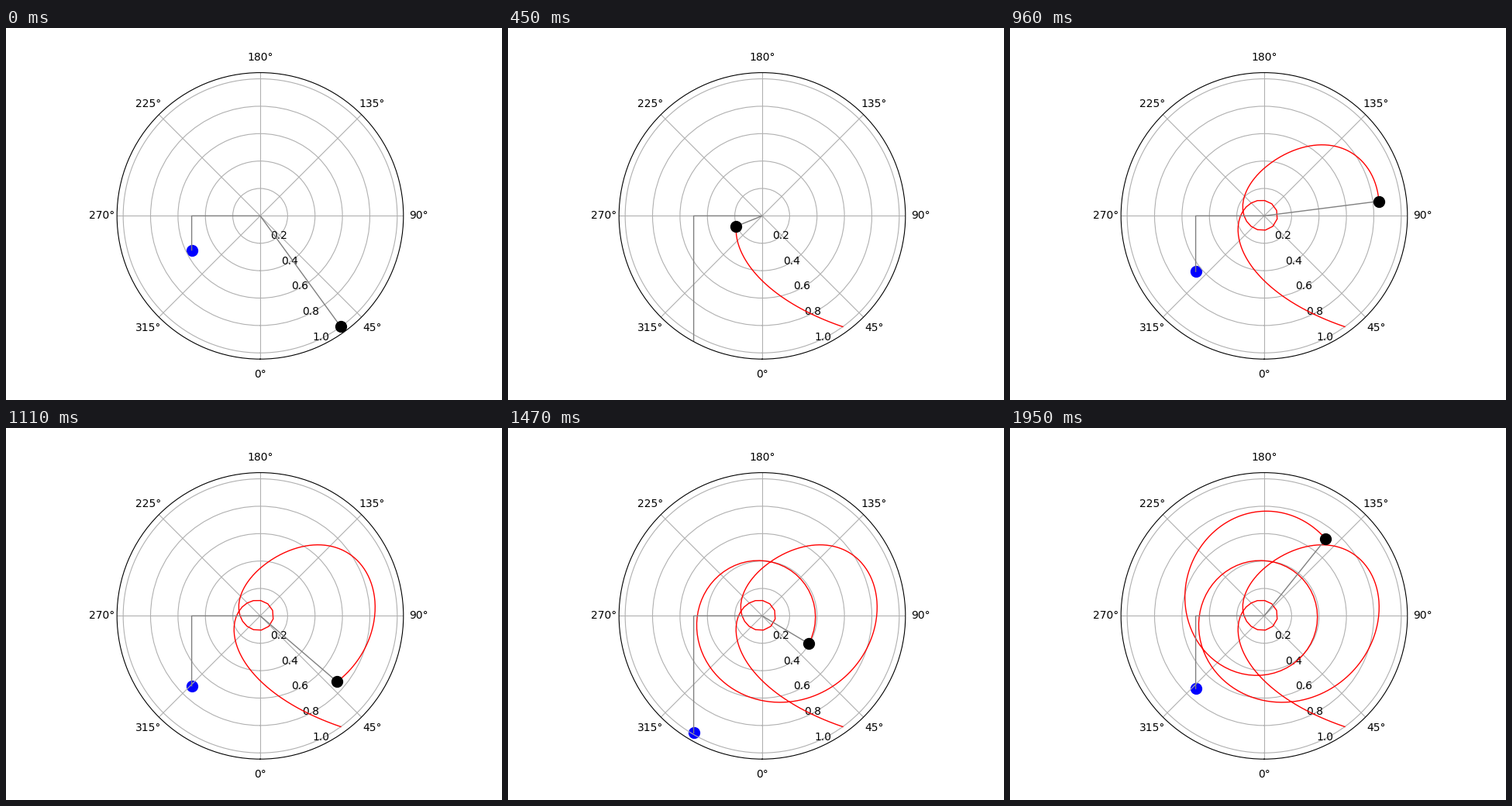
A matplotlib script that plays this animation: 640 by 480 pixels, repeating every 1980 ms.

```python
import math

import numpy as np
import matplotlib.pyplot as plt
from matplotlib.animation import FuncAnimation

# Swinging Atwood machine: a heavy counterweight and a free pendulum bob
G = 9.81
MU = 10.0            # counterweight mass / bob mass
ROPE = 1.25          # free rope length
PULLEY_X = 0.5       # distance between the two pulleys
DT = 0.005
STEPS_PER_FRAME = 6
FRAMES = 66
SUBSTEPS = 20


def deriv(s):
    r, th, vr, w = s
    return (vr,
            w,
            (r * w * w + G * (math.cos(th) - MU)) / (MU + 1),
            -(G * math.sin(th) + 2 * vr * w) / r)


def shift(s, k, h):
    return tuple(a + h * b for a, b in zip(s, k))


def rk4(s, h):
    k1 = deriv(s)
    k2 = deriv(shift(s, k1, h / 2))
    k3 = deriv(shift(s, k2, h / 2))
    k4 = deriv(shift(s, k3, h))
    return tuple(a + h / 6 * (p + 2 * q + 2 * u + v)
                 for a, p, q, u, v in zip(s, k1, k2, k3, k4))


def simulate(state, count):
    path = [state[:2]]
    for _ in range(count):
        for _ in range(SUBSTEPS):
            state = rk4(state, DT / SUBSTEPS)
        path.append(state[:2])
    return np.array(path).T


radius, angle = simulate((1.0, math.pi / 5, 0.0, 0.0),
                         (FRAMES - 1) * STEPS_PER_FRAME)

fig = plt.figure(figsize=(6.4, 4.8), dpi=100)
ax = fig.add_subplot(projection="polar")
ax.set_theta_zero_location("S")
ax.set_ylim(0, 1 + 0.05 * (1 - radius.min()))
ax.set_yticks([0.2, 0.4, 0.6, 0.8, 1.0])

weight, = ax.plot([], [], "o", color="blue", ms=10, zorder=1)
trail, = ax.plot([], [], color="red", lw=1)
rope, = ax.plot([], [], color="gray", lw=1)
bob, = ax.plot([], [], "o", color="black", ms=10)


def update(frame):
    i = frame * STEPS_PER_FRAME
    r, th = radius[i], angle[i]
    drop = ROPE - r
    w_th = -math.atan2(PULLEY_X, drop)
    w_r = math.hypot(PULLEY_X, drop)

    trail.set_data(angle[:i + 1], radius[:i + 1])
    rope.set_data([w_th, -math.pi / 2, 0, th], [w_r, PULLEY_X, 0, r])
    weight.set_data([w_th], [w_r])
    bob.set_data([th], [r])
    return weight, trail, rope, bob


anim = FuncAnimation(fig, update, frames=FRAMES, interval=30,
                     repeat=True, repeat_delay=0)
plt.show()
```
